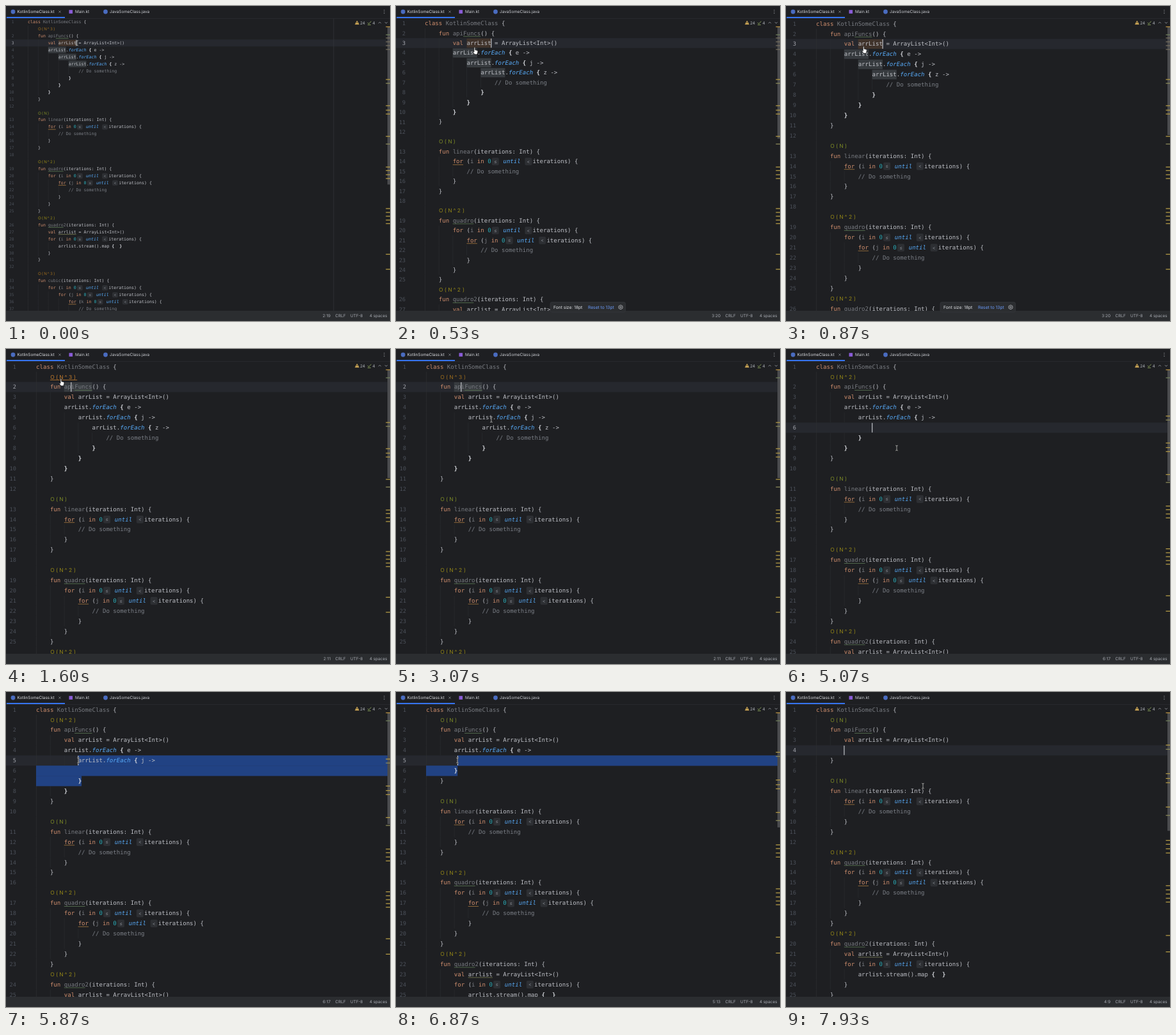
An HTML page with a canvas for the animation above (8 s loop, 600x493 px).

```html
<!DOCTYPE html>
<html lang="en">
<head>
<meta charset="utf-8">
<title>Code editor</title>
<style>
html, body { margin: 0; width: 100%; height: 100%; overflow: hidden; background: #1e1f22; }
canvas { display: block; }
</style>
</head>
<body>
<canvas id="stage" width="600" height="493"></canvas>
<script>
const ctx = document.getElementById('stage').getContext('2d');
const W = 600, H = 493, EDITOR_TOP = 19.5, EDITOR_BOTTOM = 477;
const LOOP = 8000, STEP = 200 / 3;
const MONO = '"DejaVu Sans Mono", monospace', SANS = 'Inter, sans-serif';

// [ ] are lambda braces, ≤ and ‹ are inline hints, a leading @n is a complexity label.
const SOURCE = `class KotlinSomeClass {
@3    fun apiFuncs() {
        val arrList = ArrayList<Int>()
        arrList.forEach [ e ->
            arrList.forEach [ j ->
                arrList.forEach [ z ->
                    // Do something
                ]
            ]
        ]
    }

@1    fun linear(iterations: Int) {
        for (i in 0≤ until ‹iterations) {
            // Do something
        }
    }

@2    fun quadro(iterations: Int) {
        for (i in 0≤ until ‹iterations) {
            for (j in 0≤ until ‹iterations) {
                // Do something
            }
        }
    }
@2    fun quadro2(iterations: Int) {
        val arrlist = ArrayList<Int>()
        for (i in 0≤ until ‹iterations) {
            arrlist.stream().map [  ]
        }
    }

@3    fun cubic(iterations: Int) {
        for (i in 0≤ until ‹iterations) {
            for (j in 0≤ until ‹iterations) {
                for (k in 0≤ until ‹iterations) {
                    // Do something
                }
            }
        }
    }`.split('\n').map(line => {
  const [, order, text] = line.match(/^(?:@(\d))?(.*)$/);
  return { order: +order || 0, text };
});

// Each edit replaces the innermost loop by an empty line.
const VERSIONS = [SOURCE];
for (const start of [5, 4, 3]) {
  const next = VERSIONS.at(-1).slice();
  next.splice(start, 3, { order: 0, text: '' });
  VERSIONS.push(next);
}

const TOKENS = [
  ['comment', /\/\/.*/, '#7a7e85'],
  ['keyword', /\b(?:class|fun|val|for|in)\b/, '#cf8e6d'],
  ['call', /\b(?:until|forEach)\b/, '#57aaf7'],
  ['dim', /KotlinSomeClass|apiFuncs|linear|quadro2?|cubic|(?<=\()[ijk]\b/, '#787b81'],
  ['number', /\b0/, '#2aacb8'],
  ['lambda', /[[\]]/, '#d5d7dc'],
  ['hint', /[≤‹]/, '#868a91'],
  ['plain', /\w+|./, '#bcbec4']
];
const TOKEN_RE = new RegExp(TOKENS.map(([name, re]) => `(?<${name}>${re.source})`).join('|'), 'g');
const TOKEN_COLOR = Object.fromEntries(TOKENS.map(([name, , color]) => [name, color]));
const ORDER_COLOR = ['', '#7c8a26', '#938617', '#9c6c1d'];
const GLYPH = { '[': '{', ']': '}', '‹': '<' };

// time, document version, caret [line, column], position text, selection anchor
const CARETS = [
  [0, 0, [3, 19], '2:19'],
  [330, 0, [3, 19], '3:20'],
  [1330, 0, [2, 10], '2:11'],
  [3600, 0, [6, 16], '2:11', [6, 16]],
  [3665, 0, [7, 20], '2:11', [6, 16]],
  [3730, 0, [8, 17], '2:11', [6, 16]],
  [3930, 0, [8, 17], '8:18 (76 chars, 2 line breaks)', [6, 16]],
  [4400, 1, [6, 16], '6:17'],
  [5530, 1, [7, 13], '6:17', [7, 13]],
  [5665, 1, [6, 12], '6:17', [7, 13]],
  [5800, 1, [5, 12], '6:17', [7, 13]],
  [6130, 2, [5, 12], '5:13'],
  [6665, 2, [6, 9], '5:13', [6, 9]],
  [6800, 2, [5, 9], '5:13', [6, 9]],
  [6930, 2, [4, 8], '5:13', [6, 9]],
  [7200, 3, [4, 8], '4:9']
];
const FIRST_ORDER = [[0, 3], [130, 0], [1000, 3], [4800, 2], [6400, 1]];
const ZOOM = [[0, 13], [130, 14], [200, 15], [265, 16], [330, 17], [400, 18]];
const POINTER = [
  [0, 111, 58], [130, 111, 58], [530, 124, 70], [930, 122, 68], [1400, 87, 52], [1870, 87, 52],
  [2670, 160, 100], [3530, 136, 123], [3600, 136, 123], [3730, 173, 155], [5070, 173, 155],
  [5200, 150, 147], [5400, 150, 147], [5530, 118, 139], [5800, 113, 107], [6200, 113, 107],
  [6600, 97, 123], [6800, 96, 107], [6870, 96, 107], [6930, 91, 91], [7200, 91, 91], [7870, 214, 147]
];

const mix = (a, b, k) => a + (b - a) * k;
const current = (list, t) => list.findLast(entry => entry[0] <= t);
const between = (t, from, to) => t >= from && t < to;

function viewAt(t) {
  if (t >= 800) return { cw: 5.47, lh: 15.93, x: 47, y: 27.6, numbers: 16 };
  const k = (current(ZOOM, t)[1] - 13) / 5;
  return { cw: mix(3.98, 5.455, k), lh: mix(10.95, 15.43, k), x: mix(34, 45, k),
           y: mix(25, 27.2, k), numbers: mix(12.6, 15, k) };
}

function pointerAt(t) {
  const i = POINTER.findLastIndex(p => p[0] <= t), a = POINTER[i], b = POINTER[i + 1] || a;
  const k = a === b ? 0 : (t - a[0]) / (b[0] - a[0]);
  return [mix(a[1], b[1], k), mix(a[2], b[2], k)];
}

function rect(x, y, w, h, color) {
  ctx.fillStyle = color;
  ctx.fillRect(x, y, w, h);
}

function rounded(x, y, w, h, r, fill, stroke) {
  ctx.beginPath();
  ctx.roundRect(x, y, w, h, r);
  ctx.fillStyle = fill;
  ctx.fill();
  if (stroke) { ctx.strokeStyle = stroke; ctx.lineWidth = 0.6; ctx.stroke(); }
}

function path(d, color, width = 0.8, fill) {
  const p = new Path2D(d);
  if (fill) { ctx.fillStyle = fill; ctx.fill(p); }
  ctx.strokeStyle = color;
  ctx.lineWidth = width;
  ctx.stroke(p);
}

function dot(x, y, r, color) {
  ctx.beginPath();
  ctx.arc(x, y, r, 0, 7);
  ctx.fillStyle = color;
  ctx.fill();
}

const kebab = (x, y) => [-2.5, 0, 2.5].forEach(d => dot(x, y + d, 0.6, '#b4b8bf'));

function label(text, x, y, color, size = 6.4, align = 'left') {
  ctx.font = `${size}px ${SANS}`;
  ctx.textAlign = align;
  ctx.fillStyle = color;
  ctx.fillText(text, x, y + size * 0.36);
}

// Draws one line of code; highlight is the name marked as used under the caret.
function drawCode(lines, index, view, y, highlight) {
  const { cw, lh } = view, size = cw / 0.602, hintWidth = 6 + 1.35 * cw;
  const { text } = lines[index];
  let x = view.x;
  const underline = (from, width, color) => rect(from, y + size * 0.52, width, 0.8, color);
  for (const match of text.matchAll(TOKEN_RE)) {
    const word = match[0], kind = Object.keys(match.groups).find(name => match.groups[name]);
    const width = word.length * cw;
    ctx.textAlign = 'left';
    if (kind === 'hint') {
      rounded(x + 1.2, y - lh * 0.37, hintWidth - 2.4, lh * 0.76, 2, '#2d2f33');
      label(GLYPH[word] || word, x + hintWidth / 2, y, TOKEN_COLOR.hint, 3 + cw * 0.75, 'center');
      x += hintWidth;
      continue;
    }
    if (word === highlight) {
      const declared = text.includes('val ');
      rect(x, y - lh / 2 + 0.5, width, lh - 1, declared ? '#40332b' : '#373b3f');
    }
    if (word === 'apiFuncs') underline(x + 3 * cw, 5 * cw, '#5d7a56');
    if (/^quadro/.test(word)) underline(x, 6 * cw, '#5d7a56');
    if (word === 'arrlist' && text.includes('val')) underline(x, width, '#7d8057');
    if (word === 'for' && lines[index + 1]?.text.includes('//')) underline(x, width, '#a8793f');
    ctx.font = `${kind === 'call' ? 'italic ' : kind === 'lambda' ? 'bold ' : ''}${size}px ${MONO}`;
    ctx.fillStyle = TOKEN_COLOR[kind];
    for (const char of word) {
      ctx.fillText(GLYPH[char] || char, x, y + size * 0.33);
      x += cw;
    }
  }
}

function drawOrder(order, view, y, hovered) {
  const x = view.x + 4 * view.cw, pitch = 4.65 + (view.cw - 3.98) * 1.61;
  const text = order > 1 ? `O(N^${order})` : 'O(N)';
  const color = hovered ? '#c07a2c' : ORDER_COLOR[order];
  [...text].forEach((char, i) => label(char, x + (i + 0.5) * pitch, y, color, view.cw * 1.55, 'center'));
  if (hovered) rect(x, y + 4.6, pitch * text.length, 0.8, color);
}

function drawEditor(t) {
  const view = viewAt(t), { cw, lh } = view;
  const [, version, caret, , anchor] = current(CARETS, t);
  const lines = VERSIONS[version];
  const highlight = t < 1330 ? 'arrList' : t < 3600 ? 'apiFuncs' : '';

  ctx.save();
  ctx.beginPath();
  ctx.rect(0, EDITOR_TOP, W, EDITOR_BOTTOM - EDITOR_TOP);
  ctx.clip();

  let row = 0;
  const layout = lines.map(({ order }, i) => {
    const shown = i === 1 ? current(FIRST_ORDER, t)[1] : order;
    const labelY = view.y + row * lh;
    if (shown) row++;
    return { shown, labelY, y: view.y + row++ * lh };
  });
  const columnX = column => view.x + column * cw;

  rect(0, layout[caret[0] - 1].y - lh / 2, W, lh, '#26282e');
  rect(columnX(120), EDITOR_TOP, 0.7, EDITOR_BOTTOM, '#36383c');

  lines.forEach(({ text }, i) => {
    const indent = text ? text.search(/\S/) : 1;
    const { y, shown } = layout[i], height = shown ? 2 * lh : lh;
    for (let c = 0; c < indent; c += 4) rect(columnX(c), y + lh / 2 - height, 0.6, height, '#2d2f33');
  });

  if (anchor) {
    const [from, to] = [anchor, caret].sort((a, b) => a[0] - b[0] || a[1] - b[1]);
    for (let n = from[0]; n <= to[0]; n++) {
      const left = n === from[0] ? columnX(from[1]) : view.x;
      const right = n === to[0] ? columnX(to[1]) : W;
      rect(left, layout[n - 1].y - lh / 2, right - left, lh + 0.3, '#214283');
    }
  }

  lines.forEach((line, i) => {
    const { y, labelY, shown } = layout[i];
    if (labelY > EDITOR_BOTTOM + lh) return;
    if (shown) drawOrder(shown, view, labelY, i === 1 && between(t, 1400, 2000));
    ctx.font = `${cw * 1.58}px ${MONO}`;
    ctx.textAlign = 'right';
    ctx.fillStyle = i + 1 === caret[0] ? '#a1a3ab' : '#4b5059';
    ctx.fillText(i + 1, view.numbers, y + cw * 0.55);
    drawCode(lines, i, view, y, highlight);
  });
  rect(columnX(caret[1]) - 0.4, layout[caret[0] - 1].y - lh / 2 + 0.5, 1.1, lh - 1, '#ced0d6');
  ctx.restore();

  drawStripe(version, lh, t < 1330);
}

function drawStripe(version, lh, usages) {
  const stretch = 73 / (73 - 2 * version);
  rect(596, 32, 4, 453 / lh * 5.98 * stretch, '#4a4b4e');
  const mark = (y, color) => rect(593.5, y - 0.6, 6.5, 1.3, color);
  mark(32.5, '#b8903f');
  mark(45, '#6f7f5c');
  if (usages) [50, 56, 62, 68].forEach(y => mark(y, '#77705f'));
  const marks = [115, 121, 156, 163, 169, 204, 216, 252, 257.5, 264, 270, 317, 323, 329, 335, 340.5, 388.5, 412];
  marks.forEach(y => mark(472 - (472 - y) * stretch, y === 121 || y === 216 ? '#8c8a5a' : '#b39a45'));
}

function drawChrome(t) {
  rect(0, 0, W, EDITOR_TOP, '#1e1f22');
  rect(0, 19, W, 0.7, '#2d2f33');
  rect(1, 17, 91, 2, '#3574f0');
  dot(11, 9, 3.4, '#4a6cc0');
  label('KotlinSomeClass.kt', 17.5, 9, '#dfe1e5');
  path('M82.3 7.3l3.4 3.4m0-3.4l-3.4 3.4', '#868a91', 0.7);
  rect(98.5, 6.2, 5.6, 5.6, '#8a5cd8');
  label('Main.kt', 108, 9, '#ced0d6');
  dot(155.5, 9, 3.4, '#4a6cc0');
  label('JavaSomeClass.java', 162, 9, '#ced0d6');
  kebab(591, 9);

  path('M548.5 23.3l3 5.4h-6z', '#d6ae58', 0.6, '#d6ae58');
  rect(548.1, 25, 0.8, 2, '#1e1f22');
  label('24', 553.3, 26.2, '#b4b8bf');
  path('M565 26l2 2 3.5-4.2M565 29.5h5', '#8ba35a', 0.9);
  label('4', 572.5, 26.2, '#b4b8bf');
  path('M582 27.2l2-2 2 2M592 25.2l2 2 2-2', '#9da0a8');

  rect(0, EDITOR_BOTTOM, W, H - EDITOR_BOTTOM, '#2b2d30');
  label(current(CARETS, t)[3], 507, 485, '#a8abb2', 6.4, 'right');
  label('CRLF', 514.5, 485, '#a8abb2');
  label('UTF-8', 538, 485, '#a8abb2');
  label('4 spaces', 568, 485, '#a8abb2');
}

function drawPopups(t) {
  if (between(t, 130, 1270)) {
    rounded(241, 463.5, 117.5, 15.5, 2.5, '#2b2d30', '#393b40');
    label(`Font size: ${current(ZOOM, t)[1]}pt`, 246, 471.3, '#dfe1e5', 6.7);
    label('Reset to 13pt', 300, 471.3, '#6b9bfa', 6.7);
    path('M351 468l3 1.7v3.4l-3 1.7-3-1.7v-3.4zM352.2 471.4a1.2 1.2 0 1 1-2.4 0 1.2 1.2 0 1 1 2.4 0', '#ced0d6', 0.7);
  }
  if (between(t, 3930, 4400)) {
    rounded(135, 164.5, 120.5, 16.3, 3, '#2b2d30', '#4a4c50');
    dot(144, 171.4, 2.6, '#f2c55c');
    rect(142.8, 174.6, 2.4, 1.2, '#c9ccd2');
    label('Extract', 153.5, 172.7, '#dfe1e5', 6.6);
    label('Surround', 182, 172.7, '#dfe1e5', 6.6);
    path('M217.5 175.2l2-5m1 5l2-5', '#ced0d6', 0.8);
    path('M230 170h6M232.5 172.5h3.5M230 175h6v-5M230 171.5l1.3 1-1.3 1', '#ced0d6', 0.7);
    kebab(246, 172.5);
  }
}

function drawPointer(t) {
  const [x, y] = pointerAt(t);
  ctx.save();
  ctx.translate(x, y);
  if (between(t, 130, 2000)) {
    path('M-2-4.2q0-1.2 .9-1.2t.9 1.2v3l3 .6q1.4.4 1.2 1.8l-.6 2.6-.6 2h-3.8l-2.6-3.4q-.5-1.2.7-1l.9.7z',
      '#111', 0.7, '#fff');
  } else {
    const beam = 'M-1.8-4q1.8 0 1.8 1v6q0 1-1.8 1M1.8-4q-1.8 0-1.8 1M0 3q0 1 1.8 1';
    path(beam, '#111', 1.6);
    path(beam, '#d8d8d8', 0.8);
  }
  ctx.restore();
}

function draw(now) {
  const t = Math.floor((now % LOOP + 5) / STEP) * STEP % LOOP;
  ctx.textRendering = 'geometricPrecision';
  rect(0, 0, W, H, '#1e1f22');
  drawEditor(t);
  drawChrome(t);
  drawPopups(t);
  drawPointer(t);
  requestAnimationFrame(draw);
}
requestAnimationFrame(draw);
</script>
</body>
</html>
```
